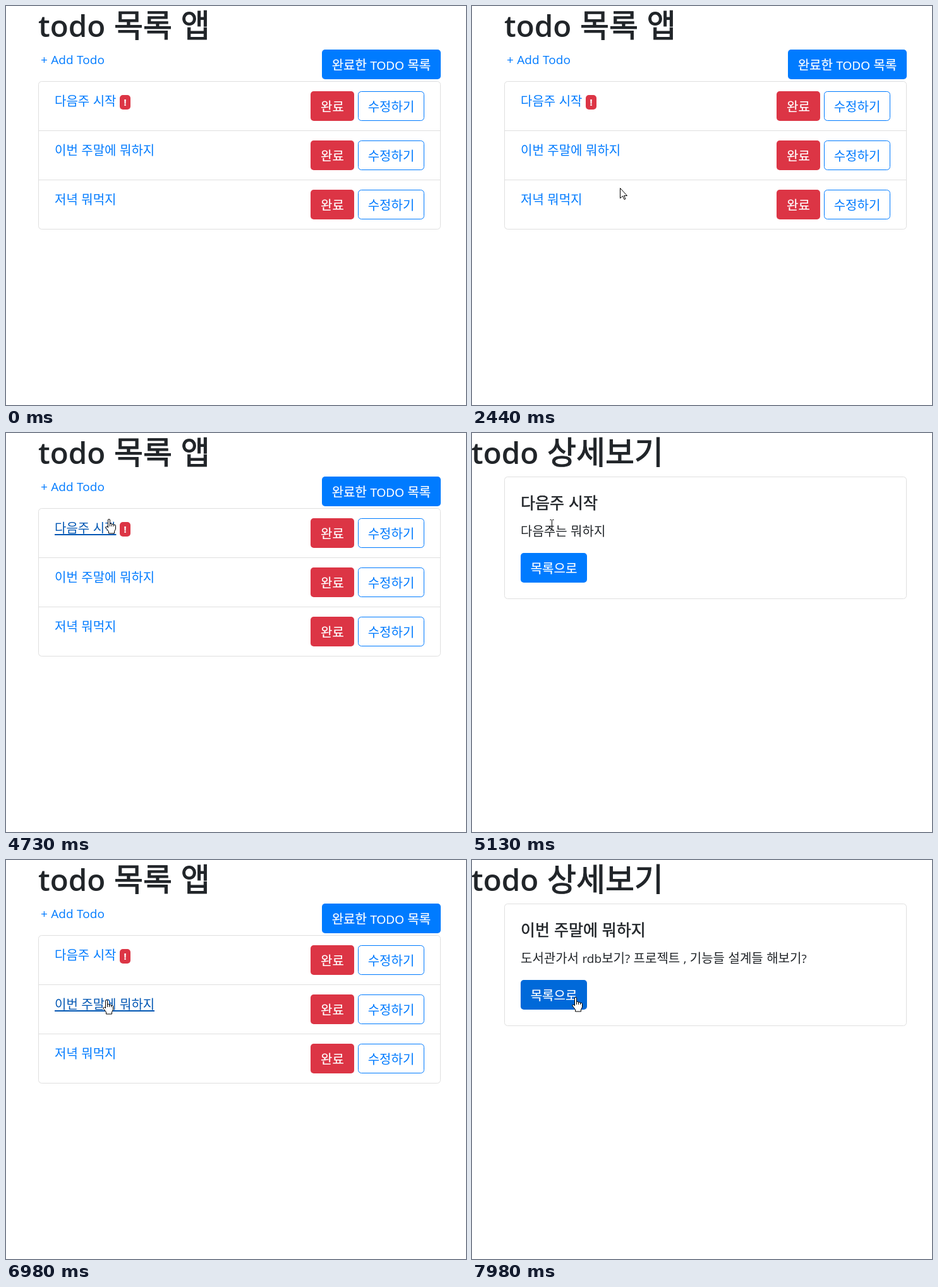
Write an HTML page that moves like this. It is 728x632 px and loops after 8 s.

```html
<!DOCTYPE html>
<html lang="ko">
<head>
<meta charset="utf-8">
<title>todo</title>
<style>
  html, body { margin: 0; width: 100%; height: 100%; overflow: hidden; background: #fff; }
  svg { display: block; }
  text { font: 20px "Noto Sans CJK KR", "Noto Sans CJK", sans-serif; fill: #212529; white-space: pre; word-spacing: .027em; }
  tspan { font-family: "Open Sans", sans-serif; font-size: .95em; }
  .title { font-size: 50px; }
  .subtitle { font-size: 25px; }
  .title, .subtitle { stroke: #212529; stroke-width: .022em; }
  .title tspan { font-weight: 600; stroke: none; }
  .badge { font-size: 15px; }
  .badge tspan { font-weight: 700; }
  .mid { text-anchor: middle; }
  .white { fill: #fff; stroke: #fff; stroke-width: .012em; }
  .blue { fill: #007bff; }
  .link.hover text { fill: #0056b3; }
  .link rect { fill: #0056b3; visibility: hidden; }
  .link.hover rect { visibility: inherit; }
  .frame { fill: none; stroke: #dfdfdf; }
  .cursor path { fill: #fff; stroke: #000; stroke-linejoin: round; }
</style>
</head>
<body>
<svg id="stage" width="728" height="632" viewBox="0 0 728 632"></svg>
<script>
const LOOP = 8000;
const BLUE = '#007bff', RED = '#dc3545';
const LEFT = 77, ROW = 78;

// Latin runs get their own font and size through tspans.
const text = (x, y, content, cls = '') =>
  `<text x="${x}" y="${y}" class="${cls}">${content.replace(/[ -~]+/g, '<tspan>$&</tspan>')}</text>`;
const box = (x, y, w, h, fill, extra = '') =>
  `<rect x="${x}" y="${y}" width="${w}" height="${h}" rx="5" fill="${fill}" ${extra}/>`;
const button = (x, y, w, label, fill, extra) =>
  box(x, y, w, 47, fill, extra) + text(x + w / 2, y + 32, label, 'mid white');
const outlineButton = (x, y, w, label) =>
  box(x + .5, y + .5, w - 1, 46, '#fff', `stroke="${BLUE}"`) + text(x + w / 2, y + 32, label, 'mid blue');
const card = (y, h) => box(51.5, y + .5, 636, h, '#fff', 'class="frame"');

const todos = ['다음주 시작', '이번 주말에 뭐하지', '저녁 뭐먹지'];
// Hangul advances .92em, a space about .27em.
const labelWidth = label => [...label].reduce((w, c) => w + (c === ' ' ? 5.4 : 18.4), 0);

const row = (label, i) => {
  const y = 119 + ROW * i;
  return (i ? `<path class="frame" d="M52 ${y + .5}H687"/>` : '') +
    `<g class="link">${text(LEFT, y + 39, label, 'blue')}
      <rect x="${LEFT}" y="${y + 41}" width="${labelWidth(label)}" height="2"/></g>` +
    button(482, y + 16, 69, '완료', RED) +
    outlineButton(557, y + 16, 105, '수정하기');
};

const listPage = `<g id="list">
  ${text(51, 49, 'todo 목록 앱', 'title')}
  ${text(55, 92, '+ Add Todo', 'blue')}
  ${button(500, 69, 188, '완료한 TODO 목록', BLUE)}
  ${card(119, ROW * 3)}
  ${todos.map(row).join('')}
  ${box(180, 141, 17, 23, RED)}${text(188.5, 158, '!', 'mid white badge')}
</g>`;

const detailPage = (id, heading, body) => `<g id="${id}">
  ${text(-1, 49, 'todo 상세보기', 'title')}
  ${card(69, 193)}
  ${text(LEFT, 120, heading, 'subtitle')}
  ${text(LEFT, 163, body)}
  ${button(LEFT, 190, 105, '목록으로', BLUE, 'class="back"')}
</g>`;

const cursors = `
<g id="arrow" class="cursor"><path d="M.5 .5v16l4-3.5 2.5 5.5 2-1-2.5-5h5Z"/></g>
<g id="hand" class="cursor">
  <path d="M-1.5 14V2a1.5 1.5 0 0 1 3 0v6q3-2 3 1 3-2 3 1 3-2 3 2v4l-2 4v3h-9v-3L-5 14q-1-3 3.5-1Z"/>
  <path d="M1.5 8v4m3-3v3m3-2v2"/>
</g>
<g id="beam" fill="none" stroke="#000"><path d="M-3-8.5h2l1 1 1-1h2M0-7.5v15M-3 8.5h2l1-1 1 1h2"/></g>`;

const stage = document.getElementById('stage');
stage.innerHTML = listPage +
  detailPage('next', todos[0], '다음주는 뭐하지') +
  detailPage('weekend', todos[1], '도서관가서 rdb보기? 프로젝트 , 기능들 설계들 해보기?') +
  cursors;

// Each pointer move starts where the last one ended; bend is a Bézier control point.
const entry = [599, 618];
const moves = [
  { from: 500, until: 640, to: [512, 543] },
  { from: 910, until: 1240, to: [178, 412] },
  { from: 1240, until: 1760, to: [336, 375], bend: [80, -20] },
  { from: 1760, until: 2440, to: [234, 288], bend: [165, 330] },
  { from: 2840, until: 3650, to: [343, 192] },
  { from: 3650, until: 3860, to: [400, 137] },
  { from: 3860, until: 4960, to: [126, 146], bend: [570, 28] },
  { from: 5400, until: 6210, to: [159, 221], bend: [303, 10] },
  { from: 7120, until: 7250, to: [156, 231] },
  { from: 7720, until: 7980, to: [164, 217] }
];
// Page shown from each time on.
const pages = [[0, 'list'], [5060, 'next'], [6850, 'list'], [7520, 'weekend']];
const FADE_START = 6210, FADE = 150;

const byId = id => document.getElementById(id);
const show = (id, on) => byId(id).setAttribute('visibility', on ? 'visible' : 'hidden');
const clamp = v => Math.min(1, Math.max(0, v));
const easeOut = p => 1 - (1 - p) ** 2;
const inside = ([x, y], left, top, w, h) => x >= left && x < left + w && y >= top && y < top + h;

function pointerAt(t) {
  let point = entry;
  for (const { from, until, to, bend } of moves) {
    if (t < from) break;
    const u = easeOut(clamp((t - from) / (until - from)));
    point = point.map((start, k) => {
      const control = bend ? bend[k] : (start + to[k]) / 2;
      return start * (1 - u) ** 2 + 2 * control * u * (1 - u) + to[k] * u * u;
    });
  }
  return point;
}

function render(t) {
  const point = pointerAt(t);
  const [since, page] = pages.filter(p => p[0] <= t).pop();
  for (const id of ['list', 'next', 'weekend']) show(id, id === page);

  const onList = page === 'list', visible = t >= moves[0].from;
  let kind = 'arrow';
  document.querySelectorAll('.link').forEach((link, i) => {
    const hover = onList && visible && inside(point, LEFT, 136 + ROW * i, labelWidth(todos[i]), 28);
    link.classList.toggle('hover', hover);
    if (hover) kind = 'hand';
  });

  const onButton = !onList && inside(point, LEFT, 190, 105, 47);
  const onText = !onList && (inside(point, LEFT, 96, 121, 30) || inside(point, LEFT, 140, 133, 30));
  if (onButton) kind = 'hand';
  else if (onText) kind = 'beam';

  const shade = onButton ? clamp((t - Math.max(since, page === 'next' ? FADE_START : 0)) / FADE) : 0;
  document.querySelectorAll('.back').forEach(b =>
    b.setAttribute('fill', `rgb(0 ${123 - 18 * shade} ${255 - 38 * shade})`));

  for (const id of ['arrow', 'hand', 'beam']) show(id, visible && id === kind);
  const offset = kind === 'beam' ? .5 : 0;
  byId(kind).setAttribute('transform',
    `translate(${Math.round(point[0]) + offset} ${Math.round(point[1])})`);
}

const start = performance.now();
function tick() {
  render((performance.now() - start) % LOOP);
  requestAnimationFrame(tick);
}
tick();
</script>
</body>
</html>
```
